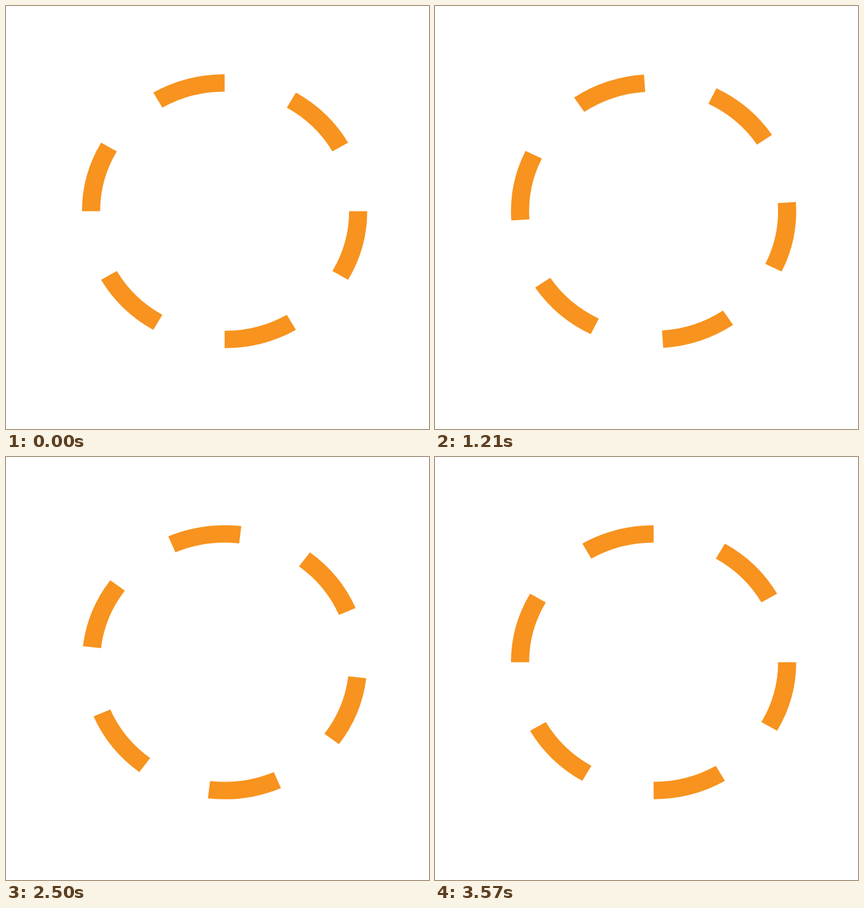
Recreate the animation shown at these times as an HTML page with a canvas. Size 640 by 640 pixels, loop 3710 ms.

```html
<!DOCTYPE html>
<html lang="en">
<head>
<meta charset="utf-8">
<title>Dashed ring</title>
<style>
  html, body { margin: 0; width: 100%; height: 100%; overflow: hidden; background: #fff; }
  canvas { display: block; }
</style>
</head>
<body>
<canvas id="stage" width="640" height="640"></canvas>
<script>
const ctx = document.getElementById('stage').getContext('2d');

const LOOP = 3710;
const FPS = 14;            // displayed rate
const MOTION_FPS = 25;     // rate at which the motion itself is stepped
const LAST_STEP = 90;
const TURNS = 3;
const DASHES = 6;
const RING = { x: 330.75, y: 310.5, radius: 194.1, width: 26.4, stretch: 1.041 };

const smoothstep = u => u * u * (3 - 2 * u);

// Time is stepped to hundredths, then to shown pictures, then to motion steps.
function angleAt(ms) {
  const hundredths = Math.floor(ms / 10 + 1e-6);
  const shown = Math.floor((hundredths + 0.5) * FPS / 100);
  const step = Math.min(LAST_STEP, Math.floor((shown + 0.5) * MOTION_FPS / FPS));
  return smoothstep(step / LAST_STEP) * TURNS * 2 * Math.PI;
}

function drawRing(angle) {
  const dash = Math.PI / DASHES;
  ctx.fillStyle = '#fff';
  ctx.fillRect(0, 0, 640, 640);
  ctx.save();
  ctx.translate(RING.x, RING.y);
  ctx.scale(RING.stretch, 1);
  ctx.rotate(angle);
  ctx.strokeStyle = '#f7931e';
  ctx.lineWidth = RING.width;
  for (let i = 0; i < DASHES; i++) {
    ctx.beginPath();
    ctx.arc(0, 0, RING.radius, 2 * i * dash, (2 * i + 1) * dash);
    ctx.stroke();
  }
  ctx.restore();
}

let start = null;
function tick(now) {
  if (start === null) start = now;
  drawRing(angleAt(Math.max(0, now - start) % LOOP));
  requestAnimationFrame(tick);
}

drawRing(0);
requestAnimationFrame(tick);
</script>
</body>
</html>
```
